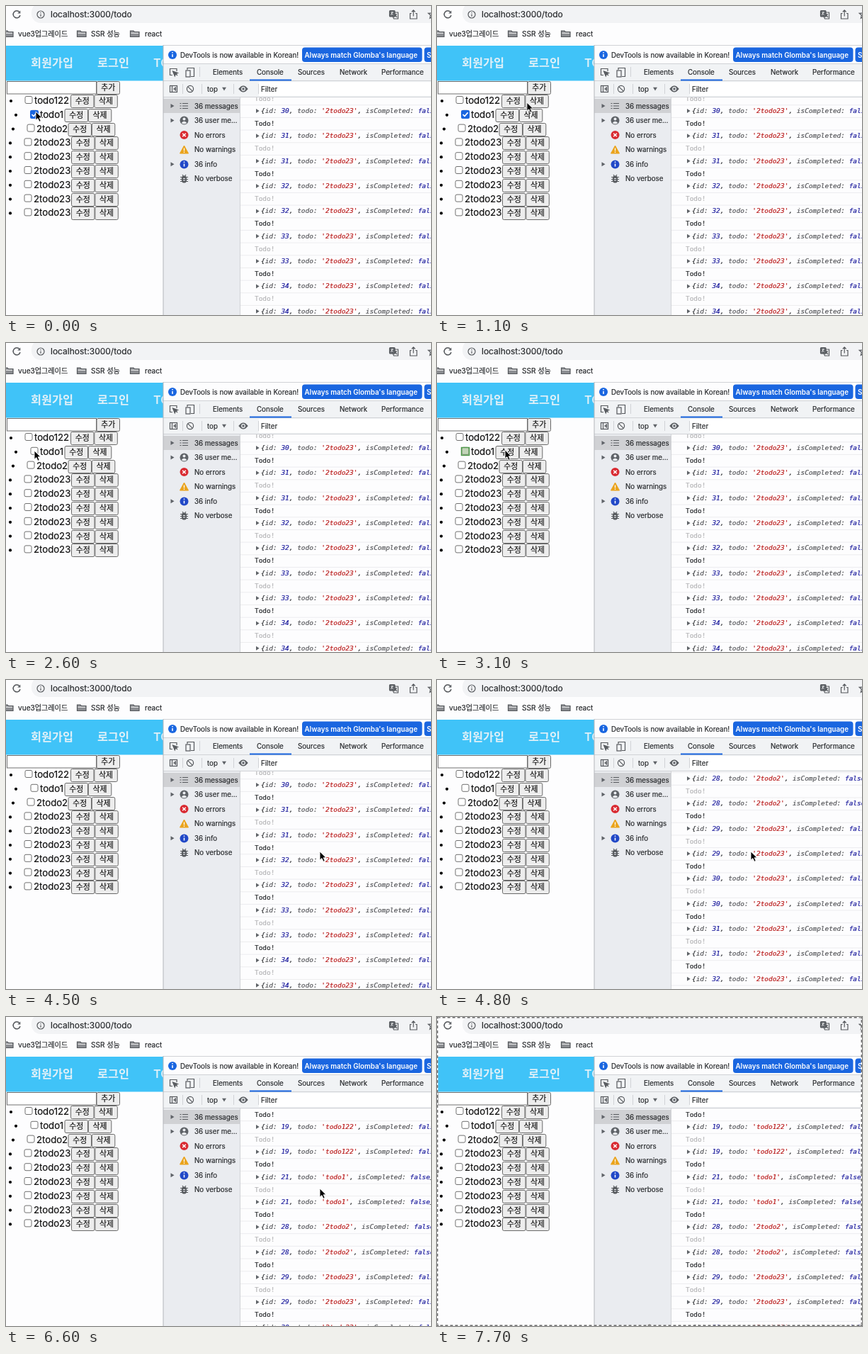
An HTML page that plays this animation: 600 by 436 pixels, repeating every 7800 ms.

```html
<!DOCTYPE html>
<html lang="ko">
<head>
<meta charset="utf-8">
<title>Todo console</title>
<style>
html, body { margin: 0; width: 100%; height: 100%; overflow: hidden; background: #fdfdfe; }
#stage { display: block; width: 600px; height: 436px; overflow: hidden; }
text {
  font: 9.75px Inter, "Noto Sans CJK KR", "Noto Sans CJK", sans-serif;
  color: #25272a; fill: currentColor; stroke: currentColor; stroke-width: .18; white-space: pre;
}
.icon { fill: none; stroke: #55585c; stroke-width: 1.2; }
.solid { fill: #5f6368; }
.line { stroke: #d0d2d6; }
.url { font-size: 12px; }
.mark { font-size: 10.1px; }
.nav { font-size: 16.3px; font-weight: 600; color: #dff0f8; stroke: none; }
.todo { font-size: 13.2px; color: #111; }
.btn rect { fill: #ededed; stroke: #696969; }
.btn text { font-size: 10.9px; color: #111; text-anchor: middle; }
.box { fill: #fff; stroke: #707070; }
.blue { fill: #1a66e0; }
.cta { font-weight: 600; color: #fff; stroke: none; }
.mono, .mono text { font: 9.45px "DejaVu Sans Mono", "Liberation Mono", monospace; }
.mono .obj { font-style: italic; }
.key { color: #505155; }
.num { color: #1a1a9c; }
.str { color: #b81616; }
.mono .dim { color: #b4b4b6; }
.flash { fill: #7fa56c; fill-opacity: .48; stroke: #4f9a4b; stroke-width: 1.4; }

.play { animation: 7.8s infinite step-end; }
#cursor { animation-name: move; animation-timing-function: ease-in-out; }
#log { animation-name: scroll; }
.full { animation-name: full; }
.empty { animation-name: empty; }
#checked { animation-name: check; }
#btnFlash { animation-name: btnFlash; }
#boxFlash { animation-name: boxFlash; }
#pointer, #frame { animation-name: frame; }
#pointer { animation-name: pointer; }

@keyframes move {
  0%, 11.5% { transform: translate(42px, 149px); }
  17.5%, 19.2% { transform: translate(259px, 116px); }
  24.2%, 25.6% { transform: translate(120px, 151px); }
  29.5%, 37% { transform: translate(40px, 152px); }
  39.6%, 40.9% { transform: translate(96px, 151px); }
  50%, 100% { transform: translate(443px, 242px); }
}
@keyframes scroll {
  0% { transform: translateY(-325px); }
  58.9% { transform: translateY(-316px); }
  60.2% { transform: translateY(-254px); }
  61.5% { transform: translateY(-157.4px); }
  62.8% { transform: translateY(-78px); }
  64% { transform: translateY(-28px); }
  65.3% { transform: translateY(-6px); }
  66.6%, 100% { transform: none; }
}
@keyframes full {
  0% { visibility: visible; }
  17.9% { visibility: hidden; }
  33.3%, 100% { visibility: visible; }
}
@keyframes empty {
  0% { visibility: hidden; }
  17.9% { visibility: visible; }
  33.3%, 100% { visibility: hidden; }
}
@keyframes check {
  0% { visibility: visible; }
  33.3%, 100% { visibility: hidden; }
}
@keyframes btnFlash {
  0% { visibility: hidden; }
  24.2% { visibility: visible; }
  25.6%, 100% { visibility: hidden; }
}
/* the checkbox repaints when the pointer leaves, enters and leaves again */
@keyframes boxFlash {
  0%, 14.1%, 29.4% { visibility: hidden; }
  12.8%, 28.1%, 39.6% { visibility: visible; }
  40.9%, 100% { visibility: hidden; }
}
@keyframes frame {
  0% { visibility: hidden; }
  88.4%, 100% { visibility: visible; }
}
@keyframes pointer {
  0% { visibility: visible; }
  88.4%, 100% { visibility: hidden; }
}
</style>
</head>
<body>
<svg id="stage" viewBox="0 0 600 436" width="600" height="436">
  <rect width="600" height="436" fill="#fdfdfe"/>

  <!-- browser bar -->
  <rect x="36" y="-4" width="600" height="28" rx="13" fill="#f2f3f5"/>
  <g class="icon">
    <path d="M19 8.6A5 5 0 1 0 20 13" stroke-width="1.5"/>
    <path d="M20.4 6.4v4.2h-4.2z" class="solid" stroke="none"/>
    <circle cx="49" cy="12" r="5"/>
    <path d="M49 11.4v3.4M49 9v1.2"/>
    <rect x="541.5" y="6.5" width="7.5" height="8.5" rx="1" fill="#5f6368"/>
    <path d="M549 9h4.5v9h-6l-1.2-3M549 12h3M550.5 11v1.5l-2 3M549.5 13l2.5 3"/>
    <path d="M543.5 9h3.5M545.2 8v1l-1.700 4M544 10l2.5 2.5" stroke="#fff" stroke-width=".8"/>
    <path d="M572.5 10.5h-2v7.5h9.5v-7.5h-2M575.2 14.5V6M572.7 8.3l2.5-2.5 2.5 2.5"/>
    <path d="M602 6l-1.6 4-4.2.3 3.2 2.7-1 4.2 3.6-2.2"/>
  </g>
  <text class="url" x="63" y="16.3">localhost:3000/todo</text>
  <g id="marks"></g>

  <!-- page -->
  <rect y="56" width="222" height="49.500" fill="#40c3f8"/>
  <text class="nav" x="35" y="86">회원가입</text>
  <text class="nav" x="129" y="86">로그인</text>
  <text class="nav" x="208" y="86">TODO</text>
  <rect class="box" x="1.5" y="106.5" width="126" height="17.500"/>
  <g id="list"></g>
  <g id="checked" class="play">
    <rect class="blue" x="34" y="147" width="12" height="12" rx="2"/>
    <path d="M36.5 153l2.5 2.6 4.6-5.4" fill="none" stroke="#fff" stroke-width="1.7"/>
  </g>
  <rect id="boxFlash" class="flash play" x="34.5" y="147.5" width="11" height="11"/>
  <rect id="btnFlash" class="flash play" x="117" y="145.5" width="32" height="17.500"/>

  <!-- developer panel -->
  <rect x="222" y="55" width="378" height="381" fill="#fdfdfe"/>
  <rect x="222" y="81" width="378" height="48" fill="#f1f3f5"/>
  <rect x="222" y="129" width="108" height="307" fill="#eaecf0"/>
  <rect x="222" y="131" width="108" height="20" fill="#d0d1d4"/>
  <rect x="357" y="107" width="243" height="20" fill="#fff"/>
  <path class="line" d="M222 55.5H600M222 81.5H600M222 105.5H600M222 128.5H600M330.5 129V436M276.5 110v14M321.5 110v14M356.5 110v14M273.5 86v14M249.5 110v14"/>
  <path d="M222 55V436" stroke="#b3b5ba"/>
  <circle class="blue" cx="235" cy="69" r="6"/>
  <path d="M235 68v4M235 65v1.5" stroke="#fff" stroke-width="1.5"/>
  <text x="246" y="72.5">DevTools is now available in Korean!</text>
  <rect class="blue" x="418" y="58.500" width="169.500" height="20.500" rx="4"/>
  <text class="cta" x="421.5" y="72.5">Always match Glomba's language</text>
  <rect class="blue" x="590.5" y="58.500" width="60" height="20.500" rx="4"/>
  <text class="cta" x="594" y="72.5">Switch</text>
  <g id="tabs"></g>
  <rect class="blue" x="344" y="103.5" width="59" height="2"/>
  <g class="icon">
    <path d="M235 97.5h-3.5v-9h9.5v3.5"/>
    <path d="M235.5 92l7 2.6-3 1.2-1.2 3z" class="solid"/>
    <path d="M242 98l-3-3"/>
    <path d="M256 90v-2.5h9.5v12H261"/>
    <rect x="254" y="91" width="6" height="9"/>
    <rect x="231.5" y="112.5" width="10" height="9"/>
    <path d="M234.5 112.5v9M239.5 115v4l-2.5-2z"/>
    <circle cx="260" cy="117" r="4.6"/>
    <path d="M256.8 113.8l6.4 6.4"/>
    <path d="M329 117q6-8 12 0-6 8-12 0z" class="solid"/>
    <circle cx="335" cy="117" r="2.3" stroke="#f1f3f5" fill="#5f6368"/>
  </g>
  <text x="284" y="120.5">top</text>
  <path class="solid" d="M305 114.8h6l-3 4.8z"/>
  <text x="360" y="120.5">Filter</text>

  <g id="side"></g>
  <g class="icon" transform="translate(251 141)">
    <path d="M-2-3.5H6M-2 0H6M-2 3.5H6M-5.5-3.5h2M-5.5 0h2M-5.5 3.5h2"/>
  </g>
  <circle class="solid" cx="251.5" cy="161.5" r="6"/>
  <g fill="#eaecf0"><circle cx="251.5" cy="159.5" r="2"/><path d="M247.7 165q3.8-4.5 7.6 0-3.8 3-7.6 0z"/></g>
  <circle cx="251.5" cy="182" r="6" fill="#d92b32"/>
  <path d="M249.2 179.7l4.6 4.6M253.8 179.7l-4.6 4.6" stroke="#fff" stroke-width="1.5"/>
  <path d="M251.5 197l6 11h-12z" fill="#eaa31b" stroke="#eaa31b" stroke-linejoin="round"/>
  <path d="M251.5 200.5v4M251.5 205.5v1.5" stroke="#fff" stroke-width="1.3"/>
  <circle cx="251.5" cy="223.5" r="6" fill="#2148c7"/>
  <path d="M251.5 222.5v4M251.5 219.5v1.5" stroke="#fff" stroke-width="1.5"/>
  <g class="icon">
    <rect x="248.7" y="240" width="5.6" height="9" rx="2.8" class="solid"/>
    <path d="M246 241.5h11M246 244.5h11M246 247.5h11M249 238l1.5 2M254 238l-1.5 2"/>
    <path d="M250 243.5h3M250 246h3" stroke="#eaecf0"/>
  </g>

  <svg x="331" y="129" width="269" height="307">
    <g class="full play"><g id="log" class="mono play"></g></g>
    <g class="empty play">
      <path d="M8 5.5l3.5 3L8 11.5" fill="none" stroke="#5a86d8" stroke-width="1.3"/>
    </g>
  </svg>

  <g id="pointer" class="play"><g id="cursor" class="play">
    <path d="M0 0V12.2L2.9 9.6 5 14.3 7.2 13.3 5.2 8.8H9z" fill="#000" stroke="#fff" stroke-width=".9"/>
  </g></g>

  <g id="frame" class="play">
    <rect x=".7" y=".7" width="598.6" height="434.6" fill="none" stroke="#fff" stroke-width="1.4"/>
    <rect x=".7" y=".7" width="598.6" height="434.6" fill="none" stroke="#6b6b6b" stroke-width="1.4" stroke-dasharray="4 3"/>
    <g id="grips" fill="#858585" stroke="#fff" stroke-width=".6"></g>
  </g>
</svg>
<script>
const put = (id, html) => { document.getElementById(id).innerHTML = html; };
const text = (x, y, s, cls = "") => `<text class="${cls}" x="${x}" y="${y}">${s}</text>`;
const span = (cls, s) => `<tspan class="${cls}">${s}</tspan>`;
const button = (x, y, s) => `<g class="btn"><rect x="${x + .5}" y="${y + .5}" width="32.5" height="18" rx="2"/>` +
  text(x + 16.7, y + 13, s) + `</g>`;

// bookmarks
const folder = x => `<path class="icon" d="M${x} 43.5v-8.5h4.5l1.5 1.7h6.5v6.8z" style="fill:#8b8d91"/>` +
  `<path d="M${x + 1} 38.2h10.5" stroke="#fff"/>`;
put("marks", [[-2.5, 17, "vue3업그레이드"], [100.5, 120, "SSR 성능"], [175.5, 196, "react"]]
  .map(([fx, x, s]) => folder(fx) + text(x, 42.7, s, "mark")).join(""));

// todo list: bullet, checkbox, label and first button positions
const rows = [[7, 26, 40, 91, "todo122"], [14, 34, 48, 82.5, "todo1"], [10, 29, 43, 87.5, "2todo2"]];
while (rows.length < 9) rows.push([6, 25, 39, 92, "2todo23"]);
put("list", button(127.5, 106, "추가") + rows.map(([dot, box, x, btn, s], i) => {
  const y = 133.3 + 19.8 * i, top = Math.round(y - 8.3);
  return `<circle cx="${dot}" cy="${y + .7}" r="2.1"/>` +
    `<rect class="box" x="${box + 1}" y="${y - 5.8}" width="10" height="10" rx="2"/>` +
    text(x, y + 4.7, s, "todo") + button(btn, top, "수정") + button(btn + 33.3, top, "삭제");
}).join(""));

put("tabs", [[292, "Elements"], [354, "Console"], [412, "Sources"], [471, "Network"], [530, "Performance"]]
  .map(([x, s]) => text(x, 97, s)).join(""));

// message filters, with counts or cleared
const filters = [["36", "messages"], ["36", "user me…"], ["No", "errors"], ["No", "warnings"], ["36", "info"], ["No", "verbose"]];
put("side", filters.map(([n, s], i) => {
  const y = 141 + 20.55 * i;
  if (n === "No") return text(266, y + 3.5, "No " + s);
  return `<g class="full play"><path class="solid" d="M232.5 ${y - 3}l5 3-5 3z"/>${text(266, y + 3.5, n + " " + s)}</g>` +
    `<g class="empty play">${text(266, y + 3.5, "No " + s)}</g>`;
}).join(""));

// console: every todo logs a label and an object twice
const todos = [[19, "todo122"], [21, "todo1"], [28, "2todo2"]];
for (let id = 29; id < 35; id++) todos.push([id, "2todo23"]);
const rowH = 17.67;
const object = (y, id, s) => `<path class="solid" d="M22 ${y - 3}l4.6 3-4.6 3z"/>` +
  text(29, y + 2.9, "{" + span("key", "id: ") + span("num", id) + ", " + span("key", "todo: ") +
    span("str", `'${s}'`) + ", " + span("key", "isCompleted: ") + span("num", "false") + "}", "obj");
put("log", todos.flatMap(([id, s], n) => [0, 1, 2, 3].map(k => {
  const top = (4 * n + k) * rowH, y = top + 8.3;
  return `<path d="M0 ${top}H269" stroke="#ececef"/>` +
    (k % 2 ? object(y, id, s) : text(20, y + 3.3, "Todo!", k ? "dim" : ""));
})).join(""));

// selection handles
put("grips", [0, 300, 600].flatMap(x => [0, 218, 436].map(y =>
  x === 300 && y === 218 ? "" : `<circle cx="${x}" cy="${y}" r="3"/>`)).join(""));
</script>
</body>
</html>
```
